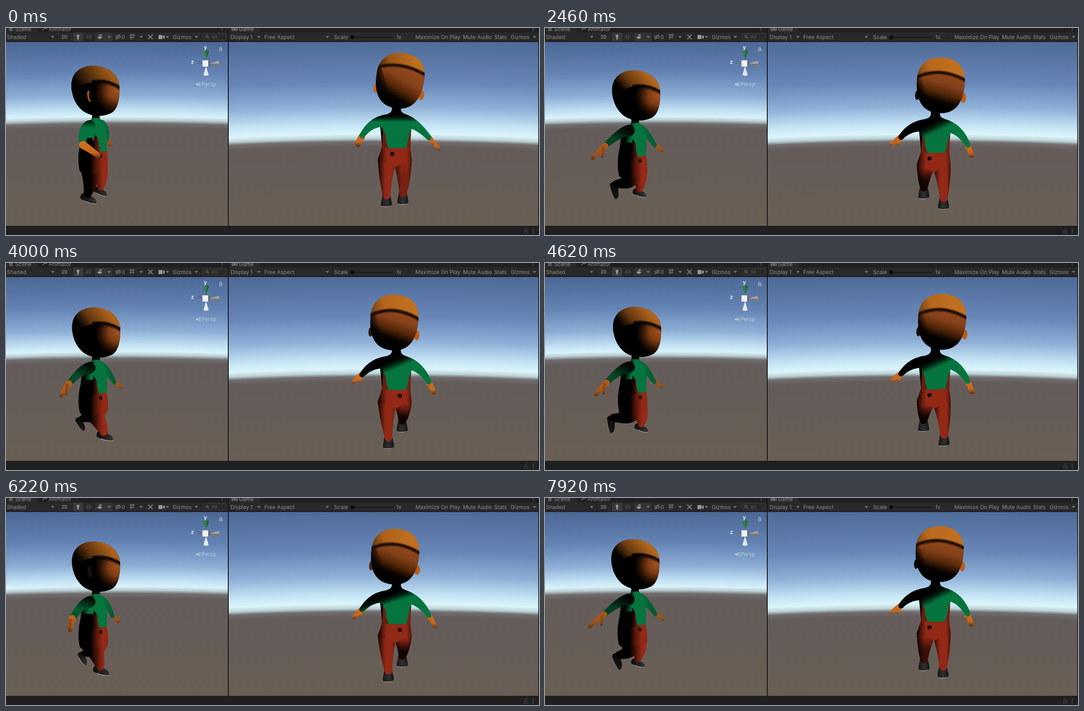
Recreate the animation shown at these times as an HTML page with a canvas. Size 1199x467 px, loop 8000 ms.

```html
<!DOCTYPE html>
<html lang="en">
<head>
<meta charset="utf-8">
<title>Walk cycle</title>
<style>
  html, body { margin: 0; width: 100%; height: 100%; overflow: hidden; background: #202020; }
  svg, canvas { position: absolute; left: 0; top: 0; width: 1199px; height: 467px; }
  text { font: 12px Inter, sans-serif; fill: #8c8c8c; }
</style>
</head>
<body>
<svg viewBox="0 0 1199 467">
  <defs>
    <!-- large radii give the horizon its slight curve -->
    <radialGradient id="sceneSky" gradientUnits="userSpaceOnUse" cx="260" cy="7631" r="7600" fr="7184" fx="260" fy="7631">
      <stop offset="0" stop-color="#695f54"/><stop offset=".53" stop-color="#645c5b"/>
      <stop offset=".557" stop-color="#716d6e"/><stop offset=".575" stop-color="#b7cbd0"/>
      <stop offset=".595" stop-color="#d9f2f8"/><stop offset=".63" stop-color="#c1e0f3"/>
      <stop offset=".71" stop-color="#8cadd4"/><stop offset=".83" stop-color="#6484b5"/>
      <stop offset="1" stop-color="#4c6896"/>
    </radialGradient>
    <radialGradient id="gameSky" gradientUnits="userSpaceOnUse" cx="850" cy="7631" r="7600" fr="7184" fx="850" fy="7631">
      <stop offset="0" stop-color="#695f54"/><stop offset=".43" stop-color="#645c5b"/>
      <stop offset=".458" stop-color="#716d6e"/><stop offset=".475" stop-color="#b9cfd4"/>
      <stop offset=".5" stop-color="#dcf5fa"/><stop offset=".55" stop-color="#c4e3f4"/>
      <stop offset=".65" stop-color="#8eafd6"/><stop offset=".78" stop-color="#6887b8"/>
      <stop offset="1" stop-color="#4f6b99"/>
    </radialGradient>
    <path id="arrow" d="M-4-2H4L0 3Z" fill="#707070"/>
  </defs>
  <rect width="1199" height="467" fill="#202020"/>
  <path d="M0 0H71V10H499V30H0ZM501 0H571V10H1199V30H501Z" fill="#292929"/>
  <rect y="31" width="499" height="416" fill="url(#sceneSky)"/>
  <rect x="501" y="31" width="697" height="416" fill="url(#gameSky)"/>
  <path d="M500 0V448M0 30.500H1199M0 447.500H1199M1198.500 31V447" stroke="#171717" stroke-width="2" fill="none"/>
  <rect x="151" y="11" width="23" height="19" fill="#3a3a3a"/>
  <rect x="200" y="11" width="40" height="19" fill="#333"/>
  <path d="M114.500 11V30M150.500 11V30M174.500 11V30M199.500 11V30M240.500 11V30M270.500 11V30M312.500 11V30M338.500 11V30M371.500 11V30M437.500 11V30M577.500 11V30M733.500 11V30M917.500 11V30M1024.500 11V30M1095.500 11V30M1131.500 11V30" stroke="#202020"/>
  <g>
    <text x="21" y="7">Scene</text><text x="96" y="7">Animator</text><text x="524" y="7">Game</text>
    <text x="2" y="25">Shaded</text><text x="125" y="24" style="font-size:10px;font-weight:600">2D</text>
    <text x="260" y="25">0</text><text x="375" y="25">Gizmos</text>
    <text x="505" y="25">Display 1</text><text x="581" y="25">Free Aspect</text>
    <text x="738" y="25">Scale</text><text x="878" y="25">1x</text>
    <text x="921" y="25">Maximize On Play</text><text x="1028" y="25">Mute Audio</text>
    <text x="1098" y="25">Stats</text><text x="1135" y="25">Gizmos</text>
  </g>
  <g id="arrows"></g>
  <!-- toolbar icons -->
  <g fill="none" stroke="#7c7c7c" stroke-width="1.3">
    <path d="M7 1H15M7 5H15M9 0V7M13 0V7M82 5L86 1H92M508 3H519" />
    <circle cx="511" cy="3" r="3"/><circle cx="518" cy="3" r="3"/>
    <path d="M246 20Q252 14 258 20Q252 26 246 20M247 26L257 14M278 16H290M278 21H288M281 13V26M286 13V24"/>
    <path d="M320 15L330 25M330 15L320 25" stroke-width="2.4"/>
    <path d="M181 17V23M184 15V25M188 15V25M191 17V23" stroke="#555"/>
    <circle cx="452" cy="19" r="2.500" stroke="#666"/><path d="M454 21L457 24" stroke="#666"/>
  </g>
  <path d="M159 18A3 3 0 0 1 165 18L163.500 22V26H160.500V22ZM205 21L211 18 217 21 211 25ZM208 16L214 14 216 18ZM343 16H352V25H343ZM353 19L357 16V25L353 22Z" fill="#999"/>
  <rect x="444.500" y="12.500" width="50" height="15" rx="3" fill="none" stroke="#404040"/>
  <text x="462" y="24" style="font-size:11px;fill:#595959">All</text>
  <path d="M779 21H871" stroke="#151515" stroke-width="2"/><circle cx="779" cy="21" r="4.500" fill="#0b0b0b"/>
  <path d="M486 0V7M1186 0V7M1186 453V463" stroke="#666" stroke-width="2" stroke-dasharray="2 2"/>
  <path d="M1166 458H1174V463H1166ZM1168 458V455A2.500 2.500 0 0 1 1173 455" fill="none" stroke="#4a4a4a"/>
  <!-- orientation gizmo -->
  <path d="M443 52Q450 48 457 52L450 71Z" fill="#348347"/><path d="M451 50L457 52L450 71Z" fill="#24663a"/>
  <path d="M458 80L478 74Q482 81 478 88Z" fill="#a3a39f"/><path d="M458 80L480 81L478 88Z" fill="#777571"/>
  <path d="M442 80L428 74V85Z" fill="#6b83aa"/><path d="M428 74L437 78M428 80H440" stroke="#3c527c"/>
  <path d="M450 86L444 106Q450 110 456 106Z" fill="#e3e6e9"/>
  <path d="M442 73H455V87H442Z" fill="#f1f1f1"/><path d="M455 73L458 75V85L455 87Z" fill="#655e58"/>
  <text x="445" y="48" style="font-weight:600;fill:#f4f4f4">y</text><text x="416" y="81" style="font-weight:600;fill:#f4f4f4">z</text>
  <path d="M438 123L427 127L438 131M427 127H438" fill="none" stroke="#d2e0ec"/>
  <text x="440" y="131" style="fill:#bccbd9">Persp</text>
  <path d="M480 47.500H486V51.500H480ZM481 47V45A2 2 0 0 1 485 45V47" fill="none" stroke="#cdd3da"/>
</svg>
<canvas width="1199" height="467"></canvas>
<script>
const ctx = document.querySelector('canvas').getContext('2d');
document.getElementById('arrows').innerHTML = [105, 232, 304, 363, 428, 569, 723, 1189]
  .map(x => `<use href="#arrow" x="${x}" y="20"/>`).join('');

// phase, twist, head x, head top, front feet (x, bottom) x2, side head x, side feet (heel x, y, angle) x2
const poses = [
  [.016, 1, 873, 69, 860, 411, 890, 386, 203, 226, 391, -18, 160, 352, 38],
  [.07, 1, 871, 74, 861, 424, 891, 382, 203, 222, 389, 12, 155, 356, 50],
  [.22, .45, 876, 68, 860, 412, 892, 381, 202, 198, 386, 18, 172, 353, 62],
  [.38, 0, 886, 56, 856, 403, 893, 398, 201, 175, 381, 20, 204, 365, 25],
  [.5, 0, 897, 67, 855, 387, 904, 406, 211, 145, 369, 33, 240, 374, -18],
  [.549, 0, 899, 73, 853, 383, 902, 424, 211, 138, 360, 45, 233, 373, 10],
  [.701, .85, 893, 70, 852, 380, 898, 413, 207, 147, 352, 80, 208, 369, 20],
  [.751, 1, 886, 62, 853, 392, 895, 404, 202, 162, 359, 62, 198, 370, 18],
  [.87, 1, 881, 56, 856, 399, 894, 401, 201, 178, 374, 30, 190, 367, 18]
];
const ORANGE = [214, 112, 32], GREEN = [6, 116, 62], RED = [146, 40, 22];

const lerp = (a, b, t) => a + (b - a) * t;
const clamp = (v, lo, hi) => Math.max(lo, Math.min(hi, v));
const shade = (c, k) => `rgb(${c.map(v => Math.round(v * k)).join(',')})`;

function poseAt(phase) {
  phase %= 1;
  const next = Math.max(0, poses.findIndex(p => p[0] > phase));
  const b = poses[next], a = poses[(next + poses.length - 1) % poses.length];
  const span = (b[0] - a[0] + 1) % 1, t = ((phase - a[0] + 1) % 1) / span;
  return a.map((v, i) => lerp(v, b[i], t));
}

function gradient(x0, y0, x1, y1, ...stops) {
  const g = ctx.createLinearGradient(x0, y0, x1, y1);
  stops.forEach(([at, color]) => g.addColorStop(at, color));
  return g;
}

function fill(d, style) {
  ctx.fillStyle = style;
  ctx.fill(new Path2D(d));
}

function stroke(d, style, width = 1) {
  ctx.strokeStyle = style;
  ctx.lineWidth = width;
  ctx.stroke(new Path2D(d));
}

function oval(x, y, rx, ry, style, angle = 0) {
  ctx.fillStyle = style;
  ctx.beginPath();
  ctx.ellipse(x, y, rx, ry, angle, 0, 7);
  ctx.fill();
}

// A tapered tube along a quadratic curve, filled with each style in turn.
function limb([x0, y0, r0], [cx, cy], [x1, y1, r1], ...styles) {
  ctx.beginPath();
  for (let i = 0; i <= 40; i++) {
    const t = i / 40, x = lerp(lerp(x0, cx, t), lerp(cx, x1, t), t), y = lerp(lerp(y0, cy, t), lerp(cy, y1, t), t);
    const r = lerp(r0, r1, t);
    ctx.moveTo(x + r, y);
    ctx.arc(x, y, r, 0, 7);
  }
  for (ctx.fillStyle of styles) ctx.fill();
}

function hand(x0, y0, r0, x1, y1, r1, k = 1) {
  const top = Math.min(y0, y1) - 7, bottom = Math.max(y0, y1) + 8;
  limb([x0, y0, r0], [(x0 + x1) / 2, (y0 + y1) / 2 - 2], [x1, y1, r1],
    gradient(0, top, 0, bottom, [0, shade(ORANGE, k)], [.65, shade(ORANGE, k * .9)], [1, shade(ORANGE, .3)]));
}

function frontHead(x, top, w) {
  const dip = (top - 60) * .7, brow = -20 + dip, arch = -50 + dip * .3;
  ctx.save();
  ctx.translate(x, top + 63);
  ctx.rotate(lerp(9, 3, w) * Math.PI / 180);
  oval(-51, 25, 5, 11, shade(ORANGE, .9 * (1 - w)));
  oval(53, 25, 6, 11, shade(ORANGE, .85));
  const skull = new Path2D('M-54-8C-55-44-32-63 1-63C36-63 54-42 54-10C55 28 42 63 0 63C-40 63-54 32-54-8Z');
  ctx.clip(skull);
  ctx.fillStyle = gradient(20, -36, lerp(-14, 2, w), lerp(46, 47, w), [0, '#984a1b'], [.4, '#83401a'], [.65, '#542609'], [.88, '#080300'], [1, '#000']);
  ctx.fill(skull);
  fill('M-56-40V64H0Z', gradient(-54, 0, lerp(-22, -40, w), -6, [0, 'rgba(0,0,0,.85)'], [1, 'rgba(0,0,0,0)']));
  const cap = gradient(-54, -20, 30, -50, [0, shade([175, 100, 28], lerp(.35, .7, w))], [.35, shade([188, 105, 29], lerp(.82, 1, w))], [1, '#bf701f']);
  fill(`M-60 ${brow}Q-5 ${arch} 60 ${brow}V-70H-60Z`, cap);
  const edge = `M-60 ${brow + 3}Q-5 ${arch + 3} 60 ${brow + 3}`;
  stroke(edge, 'rgba(25,10,2,.4)', 10);
  stroke(edge, '#1e0e04', 5);
  ctx.restore();
}

function frontLeg(hipX, hipY, footX, footY, otherY) {
  const dark = clamp((otherY - footY) / 28, 0, .9), ankle = footY - 25;
  fill(`M${footX - 9} ${ankle - 2}C${footX - 12} ${footY - 10} ${footX - 15} ${footY - 2} ${footX - 9} ${footY}H${footX + 9}C${footX + 15} ${footY - 2} ${footX + 11} ${footY - 14} ${footX + 8} ${ankle - 2}Z`,
    gradient(footX - 12, 0, footX + 12, 0, [0, '#171717'], [.5, '#303030'], [1, '#151515']));
  stroke(`M${footX - 11} ${footY - 1}Q${footX} ${footY + 2} ${footX + 11} ${footY - 2}`, 'rgba(225,225,225,.75)');
  limb([hipX, hipY, 20.500], [lerp(hipX, footX, .5) + (footX > 875 ? 4 : -3), (hipY + ankle) / 2], [footX, ankle, 8.500],
    gradient(hipX - 21, 0, hipX + 21, 0, [0, '#0a0200'], [.2, shade(RED, .55)], [.42, shade(RED, 1)], [.78, shade(RED, 1)], [1, shade(RED, .4)]),
    gradient(0, hipY + 4, 0, hipY + 34, [0, 'rgba(0,0,0,0)'], [1, `rgba(0,0,0,${dark})`]));
}

function drawFront([, w, headX, top, rightX, rightY, leftX, leftY]) {
  const y = d => top + d, waist = y(213);
  const slope = (1 - w) * clamp(leftY - rightY, 0, 20) * .35;
  const waistRight = waist + slope, waistLeft = waist - slope;
  const legs = [[857, waist + 30, rightX, rightY, leftY], [892, waist + 30, leftX, leftY, rightY]];
  if (rightY > leftY) legs.reverse();
  legs.forEach(leg => frontLeg(...leg));
  fill(`M846 ${waistRight - 2}L909 ${waistLeft - 2}L913 ${waist + 30}Q895 ${waist + 30} 876 ${waist + 46}Q858 ${waist + 34} 836 ${waist + 30}Z`,
    gradient(837, 0, 913, 0, [0, '#100300'], [.12, shade(RED, .55)], [.26, shade(RED, 1)], [.85, shade(RED, 1)], [1, shade(RED, .5)]));

  const cloth = gradient(lerp(878, 866, w), y(lerp(140, 150, w)), lerp(878, 877, w), y(lerp(156, 171, w)),
    [0, '#000'], [.4, '#021a0d'], [1, shade(GREEN, 1)]);
  const rightWrist = [801, y(lerp(187, 179, w))], leftWrist = [951, y(lerp(191, 198, w))];
  hand(...rightWrist, 7, rightWrist[0] + lerp(-9, -24, w), rightWrist[1] + lerp(18, 16, w), lerp(7, 3, w));
  hand(...rightWrist, 5, rightWrist[0] + lerp(3, -8, w), rightWrist[1] + lerp(6, 17, w), 3);
  hand(...leftWrist, 6, leftWrist[0] + lerp(24, 7, w), leftWrist[1] + lerp(27, 23, w), lerp(3, 6, w));
  hand(...leftWrist, 5, leftWrist[0] + lerp(9, -5, w), leftWrist[1] + lerp(14, 7, w), 3);
  limb([856, y(153), 14], [822, y(154)], [...rightWrist, 6], cloth);
  limb([898, y(153), 14], [lerp(924, 934, w), y(160)], [...leftWrist, 6], cloth);
  fill(`M867 ${y(118)}Q872 ${y(134)} 858 ${y(138)}Q838 ${y(144)} 842 ${y(172)}L847 ${waistRight}Q878 ${waist + 5} 908 ${waistLeft}L912 ${y(172)}Q915 ${y(146)} 898 ${y(138)}Q884 ${y(134)} 890 ${y(118)}Z`, cloth);
  fill(`M842 ${y(166)}L848 ${y(172)}L850 ${waistRight}L846 ${waistRight}Z`, '#0a0604');
  fill(`M849 ${y(176)}Q856 ${y(184)} 855 ${y(198)}L860 ${waistRight + 2}L846 ${waistRight}Z`, shade(RED, .72));
  fill(`M909 ${y(176)}L911 ${y(178)}L910 ${waistLeft}L901 ${waistLeft + 1}L905 ${y(196)}Z`, shade(RED, .8));
  oval(865 + clamp(rightY - leftY, 0, 26) * .8, y(228), 5, 4.500, '#180a07');
  frontHead(headX, top, w);
}

function sideHead(x, top, w) {
  ctx.save();
  ctx.translate(x, top + 57);
  const skull = new Path2D('M-54-12C-54-42-32-57-5-57C28-57 52-38 54-12C56 16 51 44 33 51C10 61-18 56-33 41C-47 27-54 8-54-12Z');
  ctx.clip(skull);
  ctx.fillStyle = '#000';
  ctx.fill(skull);
  const face = ctx.createRadialGradient(50, -2, 2, 48, 2, 50);
  face.addColorStop(0, '#a0501d');
  face.addColorStop(.4, '#7d3c14');
  face.addColorStop(.75, '#2a1205');
  face.addColorStop(1, '#000');
  fill('M-10-30H60V60H-10Z', face);
  const cap = gradient(lerp(-36, -24, w), -4, 26, -48, [0, '#000'], [.4, shade([170, 94, 27], lerp(.42, .62, w))], [1, shade([181, 103, 30], lerp(.86, 1, w))]);
  fill('M-60 5Q5-42 60-8V-60H-60Z', cap);
  stroke('M-8-20Q24-27 58-5', 'rgba(0,0,0,.45)', 10);
  stroke('M-8-21Q24-28 58-6', '#0c0602', 4);
  ctx.globalAlpha = clamp(1 - w * 1.4, 0, 1);
  oval(-14, 12, 4, 13, '#a8561c', -.15);
  oval(-11, 13, 3, 11, '#160900', -.15);
  ctx.restore();
}

function sideLeg(hipX, hipY, x, y, angle, size) {
  const turn = angle * Math.PI / 180, lit = x > 165;
  ctx.save();
  ctx.translate(x, y);
  ctx.rotate(turn);
  ctx.scale(size, size);
  fill('M-7-4C-4-11 9-10 15-7C26-6 33-1 31 6Q16 9-4 7Q-9 4-7-4Z', gradient(-6, 0, 30, 0, [0, '#0b0b0b'], [1, lit ? '#353434' : '#171513']));
  stroke('M4 8Q20 10 32 5', lit ? 'rgba(225,225,225,.75)' : 'rgba(190,190,190,.25)');
  ctx.restore();
  const ankleX = x + 7 * Math.cos(turn) + 6 * Math.sin(turn), ankleY = y - 8 + 5 * Math.sin(turn);
  const bend = 6 + Math.max(0, angle - 30) * .5;
  limb([hipX, hipY, 24 * size], [(hipX + ankleX) / 2 + bend, (hipY + ankleY) / 2 + bend * .5], [ankleX, ankleY, 9 * size],
    gradient(190, 0, 224, 0, [0, '#000'], [.35, '#3a1008'], [.8, shade(RED, 1)], [1, shade(RED, 1.05)]));
}

function drawSide([, w, , frontTop, , , , , x, nearX, nearY, nearAngle, farX, farY, farAngle]) {
  const top = frontTop + 29, y = d => top + d, waist = y(195);
  const shift = (x - 201) * .2;
  // far arm
  const farWrist = [lerp(227, 249, w), y(lerp(166, 170, w))];
  hand(...farWrist, 4, lerp(234, 266, w), y(lerp(178, 180, w)), 4, .8);
  limb([214, y(133), 11], [lerp(226, 231, w), y(142)], [...farWrist, 4.500], gradient(215, 0, 240, 0, [0, shade(GREEN, 1)], [1, shade(GREEN, .8)]));
  sideLeg(209 + shift, y(226), farX, farY, farAngle, .84);
  sideLeg(190 + shift, y(226), nearX, nearY, nearAngle, 1);

  ctx.save();
  ctx.translate(shift, 0);
  ctx.save();
  const body = new Path2D(`M192 ${y(106)}Q197 ${y(121)} 186 ${y(126)}Q170 ${y(136)} 168 ${y(172)}Q159 ${y(210)} 166 ${y(238)}Q184 ${y(256)} 207 ${y(238)}Q218 ${y(238)} 229 ${y(232)}Q230 ${y(208)} 226 ${y(190)}Q230 ${y(150)} 219 ${y(128)}Q207 ${y(119)} 212 ${y(106)}Z`);
  ctx.clip(body);
  ctx.fillStyle = '#000';
  ctx.fill(body);
  const edge = lerp(176, 187, w);
  fill(`M160 ${y(118)}H235V${waist - 1}L160 ${waist + 7}Z`, gradient(edge, y(128), edge + 14, y(lerp(136, 131, w)), [0, '#000'], [1, shade(GREEN, 1)]));
  fill(`M160 ${y(163)}H194L204 ${waist}V${waist + 6}H160Z`, '#000');
  fill(`M160 ${waist + 3}L235 ${waist - 3}V${y(260)}H160Z`, gradient(190, 0, 217, 0, [0, '#000'], [.45, '#521609'], [1, shade(RED, 1)]));
  const strap = lerp(0, -5, w);
  fill(`M${200 + strap} ${y(155)}Q${210 + strap} ${y(164)} ${208 + strap} ${y(176)}L${213 + strap} ${waist + 2}L192 ${waist + 4}Z`, gradient(194, 0, 209, 0, [0, '#000'], [1, shade(RED, .8)]));
  ctx.restore();
  oval(213, y(204), 3.500, 4, '#130906');

  // near arm
  const wrist = [lerp(173, 131, w), y(lerp(179, 170, w))], tip = [lerp(207, 97, w), y(lerp(203, 197, w))];
  limb([188, y(136), 13], [lerp(170, 166, w), y(lerp(144, 139, w))], [...wrist, lerp(8, 6, w)],
    gradient(190, y(122), lerp(190, 166, w), y(lerp(140, 166, w)), [0, '#000'], [.4, shade(GREEN, lerp(.5, .12, w))], [1, shade(GREEN, lerp(1, .55, w))]));
  hand(...wrist, lerp(9, 7, w), ...tip, lerp(6, 4, w), lerp(1, .8, w));
  if (w > .4) hand(wrist[0] - 4, wrist[1] + 4, 4, wrist[0] - 6, wrist[1] + 23, 3, .7);
  ctx.restore();
  sideHead(x, top, w);
}

const start = performance.now();

function draw() {
  const time = (performance.now() - start) % 8000;
  // standing still first, then stepped walking
  const step = Math.max(0, Math.floor((time - 970) / 77.2 + .05));
  const pose = poseAt(.38 + step / 14.15);
  ctx.clearRect(0, 0, 1199, 467);
  drawSide(pose);
  drawFront(pose);
  requestAnimationFrame(draw);
}
draw();
</script>
</body>
</html>
```
